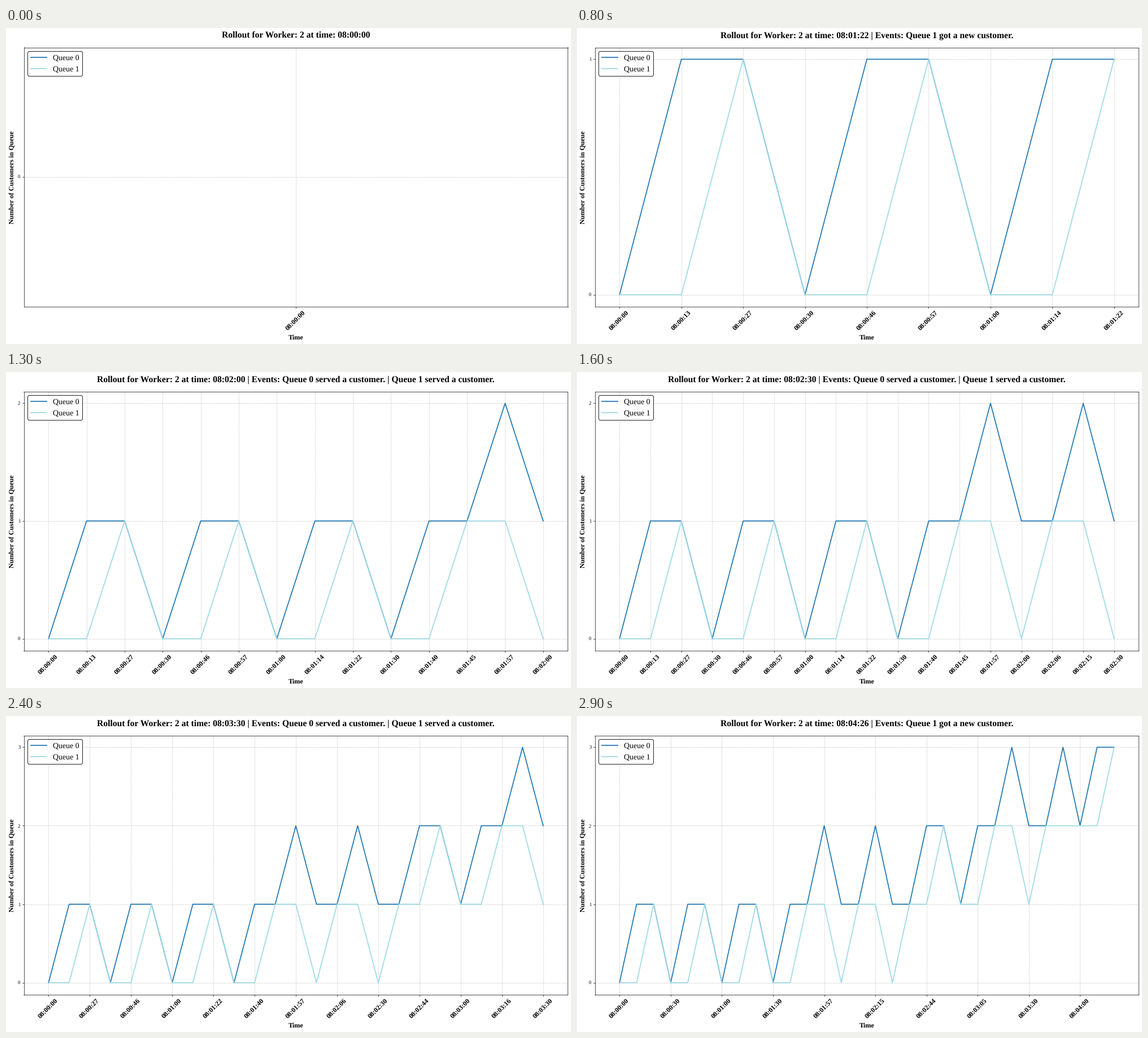
Recreate the animation shown at these times as a matplotlib script. Size 1000x560 px, loop 3 s.

```python
import matplotlib.pyplot as plt
from matplotlib.animation import FuncAnimation

WIDTH, HEIGHT, DPI = 1000, 560, 62.5
LEFT, RIGHT, TOP, BOTTOM = 31.5, 994.5, 34.5, 493.5

# Seconds after 08:00:00 at which something happens, and both queue lengths.
SECONDS = [0, 13, 27, 30, 46, 57, 60, 74, 82, 90, 100, 105, 117, 120, 126,
           135, 150, 157, 164, 172, 180, 185, 196, 204, 210, 221, 232, 240,
           253, 266]
QUEUES = [[int(c) for c in "011011011011211211221223223233"],
          [int(c) for c in "001001001001101101121122122223"]]
COLORS = ["#1f77b4", "#9edae5"]

plt.rcParams.update({"font.family": "Liberation Serif", "text.hinting": "none"})


def clock(seconds):
    return f"08:{seconds // 60:02d}:{seconds % 60:02d}"


def events(step):
    """Describe how each queue changed at this step."""
    if step == 0:
        return []
    found = []
    for number, queue in enumerate(QUEUES):
        change = queue[step] - queue[step - 1]
        if change:
            action = "got a new" if change > 0 else "served a"
            found.append(f"Queue {number} {action} customer.")
    return found


def padded(upper):
    """Axis limits with a five percent margin around 0..upper."""
    return (-0.05 * upper, 1.05 * upper) if upper else (-0.055, 0.055)


def label(x, y, text, rotation=0):
    fig.text(x / WIDTH, 1 - y / HEIGHT, text, fontsize=14, fontweight="bold",
             ha="center", va="baseline", rotation=rotation,
             rotation_mode="anchor")


fig = plt.figure(figsize=(WIDTH / DPI, HEIGHT / DPI), dpi=DPI, facecolor="white")
ax = fig.add_axes([LEFT / WIDTH, 1 - BOTTOM / HEIGHT,
                   (RIGHT - LEFT) / WIDTH, (BOTTOM - TOP) / HEIGHT])
ax.grid(True, linestyle="--", alpha=0.7)
ax.set_axisbelow(True)
ax.tick_params(axis="y", labelsize=10)
lines = [ax.plot([], [], color=color, lw=2, label=f"Queue {number}")[0]
         for number, color in enumerate(COLORS)]
ax.legend(loc="upper left", fontsize=16, edgecolor="black", framealpha=1)
label(513, 551.8, "Time")
label(14.4, 264.3, "Number of Customers in Queue", rotation=90)


def update(step):
    count = step + 1
    for line, queue in zip(lines, QUEUES):
        line.set_data(range(count), queue[:count])

    ticks = range(0, count, max(1, count // 10))
    ax.set_xticks(ticks, labels=[clock(SECONDS[i]) for i in ticks],
                  rotation=45, fontsize=14, fontweight="bold")
    highest = max(max(queue[:count]) for queue in QUEUES)
    ax.set_yticks(range(highest + 1))
    ax.set_xlim(padded(step))
    ax.set_ylim(padded(highest))

    title = f"Rollout for Worker: 2 at time: {clock(SECONDS[step])}"
    happened = events(step)
    if happened:
        title += " | Events: " + " | ".join(happened)
    ax.set_title(title, fontsize=18, fontweight="bold", pad=20)
    return lines


animation = FuncAnimation(fig, update, frames=len(SECONDS), interval=100,
                          init_func=lambda: update(0), repeat=True,
                          repeat_delay=0, blit=False)
plt.show()
```
